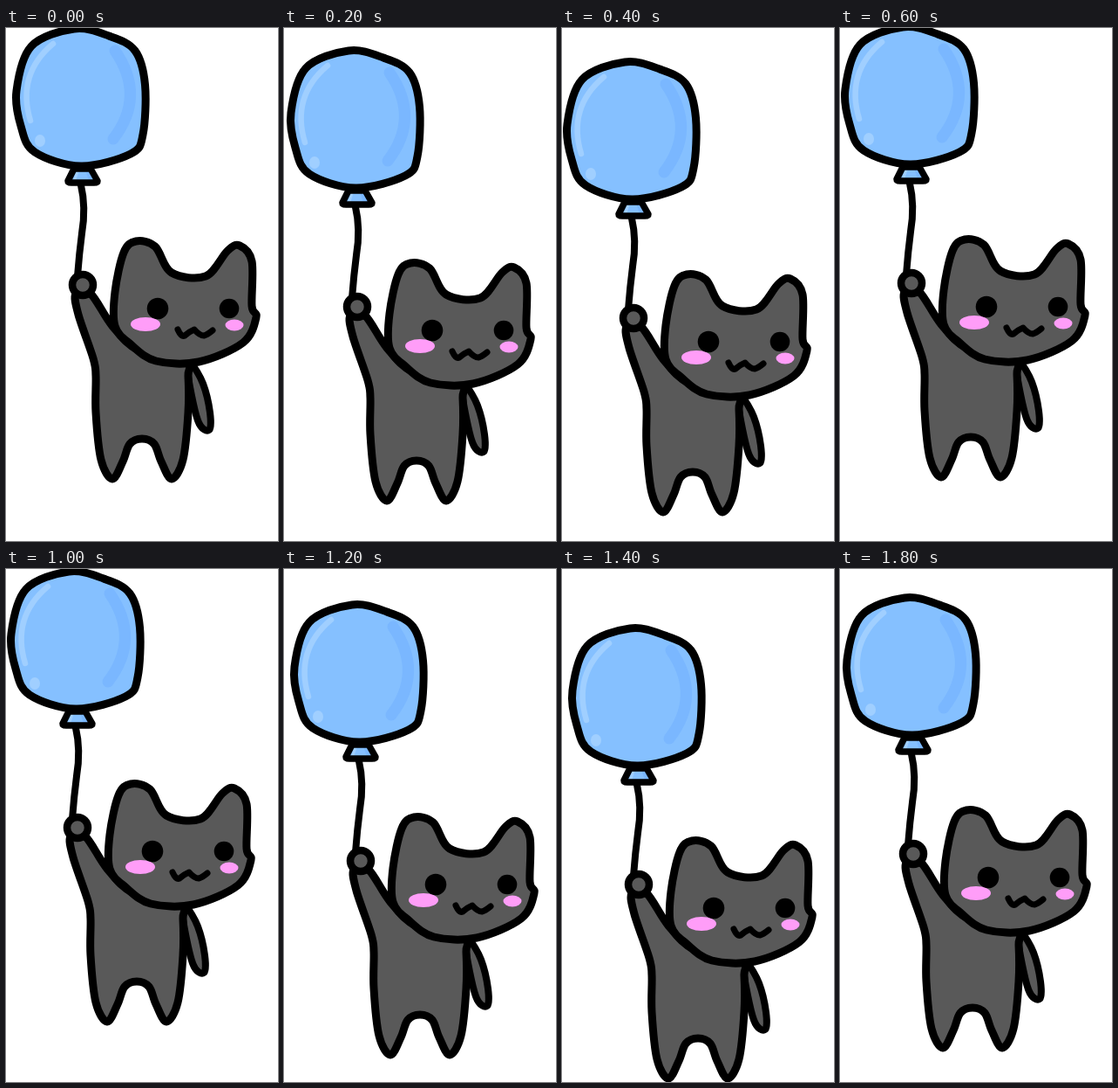
Write an HTML page with a canvas that moves like this. It is 312 by 587 pixels and loops after 2 s.

```html
<!DOCTYPE html>
<html lang="en">
<head>
<meta charset="utf-8">
<title>Cat with balloon</title>
<style>
html, body { margin: 0; width: 100%; height: 100%; overflow: hidden; background: #fff; }
canvas { display: block; }
</style>
</head>
<body>
<canvas id="stage" width="312" height="587"></canvas>
<script>
const ctx = document.getElementById('stage').getContext('2d');
const WIDTH = 312, HEIGHT = 587, LOOP = 2000, STEP = 200;
const INK = '#000', FUR = '#595959', BLUE = '#85c0ff', SHADE = '#7ab7ff', SHINE = '#a0cfff', PINK = '#ff9df8';
const LINE = 9;

// The drawing hops between heights and sways left in the first half
const HOPS = [0, 25, 38, -2, 26, 2, 40, 67, 67, 32];
const swayAt = step => step === 1 || step === 9 ? -4 : step > 1 && step < 6 ? -6 : 0;

const mirror = points => points.map(([x, y]) => [WIDTH - x, y]).reverse();

// Smooth path through the points (Catmull-Rom)
function curve(points, closed = true) {
  const n = points.length;
  const at = i => points[closed ? (i + n) % n : Math.max(0, Math.min(n - 1, i))];
  const path = new Path2D();
  path.moveTo(...points[0]);
  for (let i = 0; i < (closed ? n : n - 1); i++) {
    const [a, b, c, d] = [at(i - 1), at(i), at(i + 1), at(i + 2)];
    path.bezierCurveTo(b[0] + (c[0] - a[0]) / 6, b[1] + (c[1] - a[1]) / 6,
      c[0] - (d[0] - b[0]) / 6, c[1] - (d[1] - b[1]) / 6, ...c);
  }
  if (closed) path.closePath();
  return path;
}

function oval(x, y, rx, ry = rx) {
  const path = new Path2D();
  path.ellipse(x, y, rx, ry, 0, 0, Math.PI * 2);
  return path;
}

function fill(path, color) {
  ctx.fillStyle = color;
  ctx.fill(path);
}

function stroke(path, width = LINE, color = INK) {
  ctx.lineWidth = width;
  ctx.strokeStyle = color;
  ctx.stroke(path);
}

function outlined(path, color, width) {
  fill(path, color);
  stroke(path, width);
}

const balloon = curve([
  [78, 1], [118, 9], [148, 26], [159.5, 65], [157, 122], [143, 144],
  [86, 158], [33, 142], [17, 112], [12, 72], [29, 21]
]);
const knot = new Path2D('M78 161 H97 L105 175 Q105 177 101 177 H75 Q71 177 71 175 Z');
const thread = new Path2D('M86 180 Q92 205 87 235 Q84 258 82 284');

const leg = [[103, 398], [103, 440], [109, 494], [122, 516], [134, 496], [142, 476], [156, 470]];
const arm = [[97, 304], [80, 304], [83, 328], [100, 378]];
const body = curve([...arm, ...leg, ...mirror(leg).slice(1), [206, 383], [152, 369], [122, 341]]);
const restingArm = curve([[213, 385], [226, 407], [234, 440], [233, 460], [220, 449], [208, 392]]);

const leftEar = [[125, 341], [125, 302], [135, 257], [149, 244], [171, 250], [190, 280]];
const rightEar = [[229, 284], [254, 255], [268, 249], [282, 267], [282, 318]];
const chin = [[287, 331], [272, 360], [221, 382], [172, 381], [143, 362]];
const head = curve([...leftEar, ...rightEar, ...chin]);
const mouth = new Path2D('M197 345 Q201 354 205 352 Q211 347 216 345 Q222 352 227 352 Q231 351 237 346');

function drawBalloon() {
  stroke(thread, 8);
  fill(knot, BLUE);
  stroke(new Path2D('M94 164 L97 173'), 5, SHADE);
  stroke(new Path2D('M82 164 L79 173'), 3, SHINE);
  stroke(knot, 7.5);

  fill(balloon, BLUE);
  stroke(new Path2D('M125 26 Q161 78 123 127'), 13, SHADE);
  stroke(new Path2D('M54 18 Q12 53 28 106'), 6.5, SHINE);
  fill(oval(39, 129, 6, 7), SHINE);
  stroke(balloon);
}

function drawCat() {
  outlined(restingArm, FUR, 8);
  outlined(body, FUR);
  outlined(oval(88, 294, 12), FUR, 8.5);
  outlined(head, FUR);

  fill(oval(174, 321, 12.3), INK);
  fill(oval(256, 321, 11.3), INK);
  fill(oval(160, 339, 17, 8), PINK);
  fill(oval(262, 340, 10.5, 6.5), PINK);
  stroke(mouth, 7);
}

function frame() {
  const step = Math.floor(performance.now() % LOOP / STEP);
  ctx.setTransform(1, 0, 0, 1, 0, 0);
  ctx.fillStyle = '#fff';
  ctx.fillRect(0, 0, WIDTH, HEIGHT);
  ctx.translate(swayAt(step), HOPS[step]);
  ctx.lineCap = ctx.lineJoin = 'round';
  drawBalloon();
  drawCat();
  requestAnimationFrame(frame);
}
frame();
</script>
</body>
</html>
```
